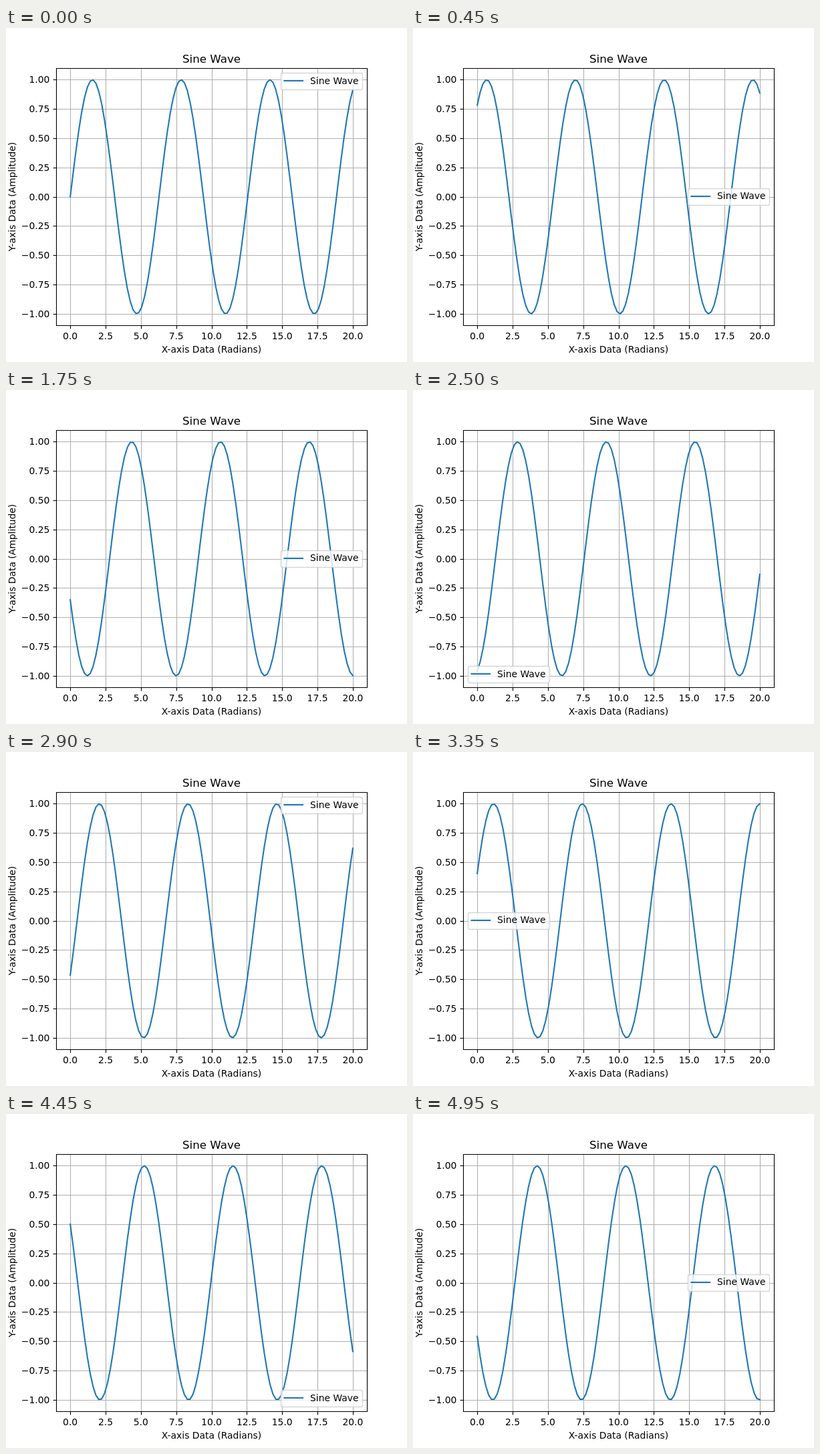
These frames come from a looping animation (600 px wide and 500 px high, 5000 ms). An HTML page with a canvas:

```html
<!DOCTYPE html>
<html lang="en">
<head>
<meta charset="utf-8">
<title>Sine Wave</title>
<style>
  html, body { margin: 0; width: 100%; height: 100%; overflow: hidden; background: #fff; }
  canvas { display: block; }
</style>
</head>
<body>
<canvas id="stage" width="600" height="500"></canvas>
<script>
const ctx = document.getElementById('stage').getContext('2d');
const LEFT = 75, RIGHT = 540, TOP = 60, BOTTOM = 445;
const PT = 100 / 72, EM = 10 * PT;
const BLUE = '#1f77b4';
const POINTS = 100, STEP_MS = 50, STEPS = 100;

// Axis limits: the data range plus a 5% margin
const Y_MAX = 1.09988, Y_MIN = -1.09772;
const px = x => LEFT + (x + 1) * (RIGHT - LEFT) / 22;
const py = y => TOP + (Y_MAX - y) * (BOTTOM - TOP) / (Y_MAX - Y_MIN);
const snap = v => Math.floor(v + 0.5) + 0.5;

// Legend box and its candidate places, in order of preference
const BOX_W = 122.3, BOX_H = 25.11, GAP = EM / 2, PAD = 0.4 * EM;
const xs = { l: LEFT + GAP, c: (LEFT + RIGHT - BOX_W) / 2, r: RIGHT - GAP - BOX_W };
const ys = { t: TOP + GAP, m: (TOP + BOTTOM - BOX_H) / 2, b: BOTTOM - GAP - BOX_H };
const places = ['rt', 'lt', 'lb', 'rb', 'rm', 'lm', 'cb', 'ct', 'cm']
  .map(([h, v]) => ({ x: xs[h], y: ys[v], middle: v === 'm' }));

function stroke(color, width) {
  ctx.strokeStyle = color;
  ctx.lineWidth = width;
  ctx.stroke();
}

function segment(x1, y1, x2, y2, color, width) {
  ctx.beginPath();
  ctx.moveTo(x1, y1);
  ctx.lineTo(x2, y2);
  stroke(color, width);
}

function label(text, x, y, align = 'center', size = EM) {
  ctx.font = `${size}px "DejaVu Sans", sans-serif`;
  ctx.textAlign = align;
  ctx.fillStyle = '#000';
  ctx.fillText(text, x, y);
}

function drawAxes() {
  const thin = 0.8 * PT, tick = 5;
  for (let v = 0; v <= 20; v += 2.5) {
    const x = snap(px(v));
    segment(x, TOP, x, BOTTOM, '#b0b0b0', thin);
    segment(x, BOTTOM + 0.5, x, BOTTOM + 0.5 + tick, '#000', thin);
    label(v.toFixed(1), px(v), 466);
  }
  for (let v = -1; v <= 1; v += 0.25) {
    const y = snap(py(v));
    segment(LEFT, y, RIGHT, y, '#b0b0b0', thin);
    segment(LEFT + 0.5 - tick, y, LEFT + 0.5, y, '#000', thin);
    label(v.toFixed(2).replace('-', '\u2212'), 65.3, Math.round(py(v) + 4.9), 'right');
  }
  label('Sine Wave', 307.5, 52, 'center', 12 * PT);
  label('X-axis Data (Radians)', 307.5, 486);
  ctx.save();
  ctx.translate(14, 252.5);
  ctx.rotate(-Math.PI / 2);
  label('Y-axis Data (Amplitude)', 0, 0);
  ctx.restore();
}

function drawFrame() {
  ctx.beginPath();
  ctx.rect(LEFT + 0.5, TOP + 0.5, RIGHT - LEFT, BOTTOM - TOP);
  stroke('#000', 0.8 * PT);
}

function drawCurve(points) {
  ctx.save();
  ctx.lineJoin = 'round';
  ctx.lineCap = 'square';
  ctx.beginPath();
  points.forEach(([x, y]) => ctx.lineTo(x, y));
  stroke(BLUE, 1.5 * PT);
  ctx.restore();
}

// Points covered by the box, plus one if the line crosses it at all
function overlap(box, points) {
  const inside = (x, y) => x > box.x && x < box.x + BOX_W && y > box.y && y < box.y + BOX_H;
  const covered = points.filter(([x, y]) => inside(x, y)).length;
  const crosses = covered > 0 || points.slice(1).some(([x2, y2], i) => {
    const [x1, y1] = points[i];
    for (let k = 0.05; k < 1; k += 0.05)
      if (inside(x1 + (x2 - x1) * k, y1 + (y2 - y1) * k)) return true;
    return false;
  });
  return covered + (crosses ? 1 : 0);
}

function drawLegend(points) {
  const scores = places.map(place => overlap(place, points));
  const box = places[scores.indexOf(Math.min(...scores))];
  const x = snap(box.x), y = snap(box.y);
  ctx.beginPath();
  ctx.roundRect(x, y, snap(box.x + BOX_W) - x, snap(box.y + BOX_H) - y, 0.2 * EM);
  ctx.globalAlpha = 0.8;
  ctx.fillStyle = '#fff';
  ctx.fill();
  stroke('#ccc', PT);
  ctx.globalAlpha = 1;

  const lineX = box.x + PAD, lineY = Math.round(box.y + 11.7);
  segment(lineX - 1, lineY, lineX + 2 * EM + 1, lineY, BLUE, 1.5 * PT);
  label('Sine Wave', Math.round(lineX + 2.8 * EM), lineY + (box.middle ? 4 : 5), 'left');
}

function render(now) {
  const phase = 0.1 * (Math.floor(now / STEP_MS) % STEPS);
  const points = Array.from({ length: POINTS }, (_, i) => {
    const x = 20 * i / (POINTS - 1);
    return [px(x), py(Math.sin(x + phase))];
  });
  ctx.fillStyle = '#fff';
  ctx.fillRect(0, 0, 600, 500);
  drawAxes();
  drawCurve(points);
  drawFrame();
  drawLegend(points);
  requestAnimationFrame(render);
}
requestAnimationFrame(render);
</script>
</body>
</html>
```
